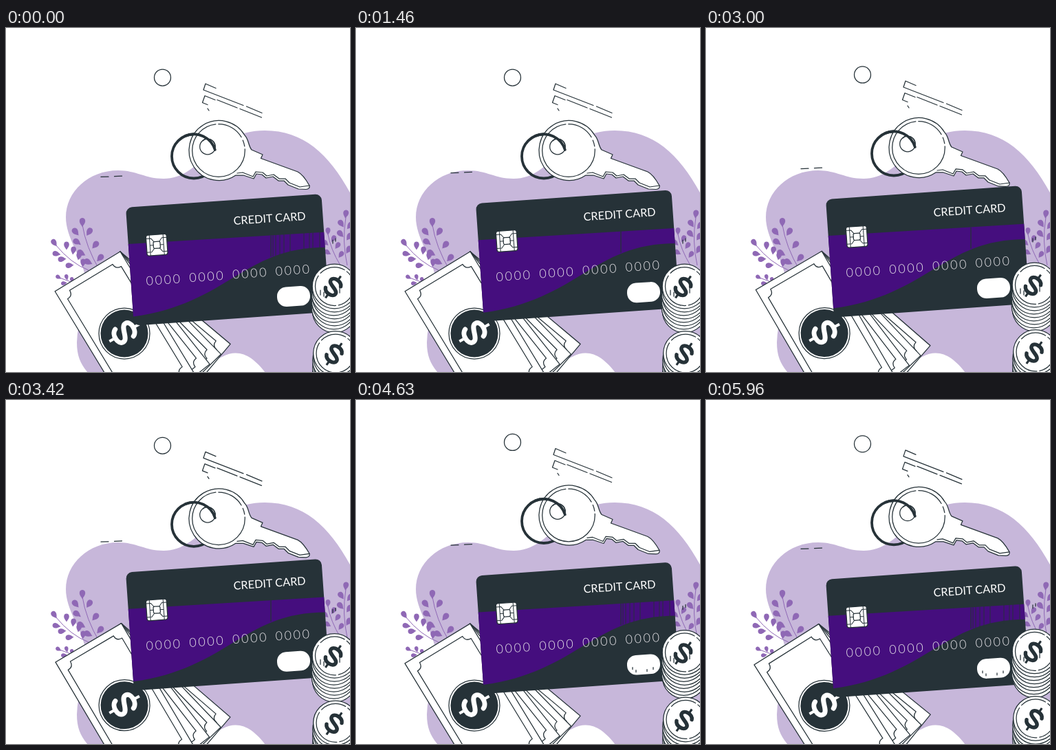
An HTML page that plays this animation: 500 by 500 pixels, repeating every 6000 ms.

```html
<!DOCTYPE html>
<html lang="en">
<head>
<meta charset="utf-8">
<title>Card, key and cash</title>
<style>
html, body { margin: 0; width: 100%; height: 100%; overflow: hidden; background: #fff; }
svg { display: block; width: 100vw; height: 100vh; }
.ink { fill: none; stroke: #263238; stroke-width: 1.25; stroke-linecap: round; stroke-linejoin: round; }
.paper { fill: #fff; }
.dark { fill: #263238; }
.leaf { fill: #8f68b5; }
.stem { fill: none; stroke: #8f68b5; stroke-width: 1; }
text { font-family: Lato, "Open Sans", sans-serif; fill: #fff; }
.digits { font-size: 18px; font-weight: 300; letter-spacing: 2.6px; fill: #e8e6ea; }
</style>
</head>
<body>
<svg viewBox="0 0 500 500" id="stage"></svg>
<script>
const LOOP = 6000, RISE = 12;

const leaf = (x, y, angle, size) =>
  `<path class="leaf" transform="translate(${x} ${y}) rotate(${angle}) scale(${size})"
    d="M0 8C-2 4-5 2-4.6-2.5C-4-8 4-8 4.6-2.5C5 2 2 4 0 8Z"/>`;

// Each leaf is [x, y, angle]; the stem runs from base to tip.
const branch = (stem, size, leaves) =>
  `<path class="stem" d="${stem}"/>` + leaves.map(l => leaf(...l, size)).join('');

const plants =
  branch('M136 352Q116 318 111 286', .9, [
    [111, 282, 0], [101, 296, -40], [121, 296, 32], [103, 311, -55], [130, 315, 40],
    [109, 327, -62], [137, 334, 42], [119, 340, -65]]) +
  branch('M120 352Q94 342 72 315', .82, [
    [70, 312, -35], [73, 328, -80], [88, 316, 0], [81, 336, -95], [98, 323, 8],
    [92, 345, -95], [106, 331, 10], [112, 341, 5]]) +
  branch('M108 374L78 363', .6, [[76, 362, -60], [88, 362, -15], [84, 371, -100], [96, 366, -15]]) +
  branch('M486 345Q472 322 468 300', .75, [
    [468, 295, 0], [476, 306, 30], [464, 312, -50], [482, 316, 35], [467, 326, -60], [487, 329, 35]]) +
  branch('M496 345Q488 310 494 275', .85, [
    [494, 270, 8], [487, 284, -35], [500, 287, 38], [486, 299, -42], [499, 303, 35], [498, 322, 30]]);

const dollar = (x, y, angle, size, color) =>
  `<g transform="translate(${x} ${y}) rotate(${angle}) scale(${size})"
    fill="none" stroke="${color}" stroke-linecap="round">
    <path stroke-width="7" d="M11-9C7-18-11-17-11-8C-11 1 11-1 11 8C11 17-7 18-11 9"/>
    <path stroke-width="4" stroke-linecap="butt" d="M0-25V-15M0 15V25"/></g>`;

// A note lies along its long side, pinned at the shared top corner of the fan.
const note = angle =>
  `<g transform="translate(166 325) rotate(${angle})" class="ink">
    <rect class="paper" width="209" height="111"/>
    <path d="M19 10H190Q190 19 199 19V92Q190 92 190 101H19Q19 92 10 92V19Q19 19 19 10Z"/></g>`;

const bills = [40, 45.5, 51.5, 58.7].map(note).join('') +
  `<circle class="ink paper" cx="172" cy="444" r="37"/>
   <circle class="dark" cx="172" cy="444" r="34.5"/>` + dollar(172, 443, 60, 1, '#fff');

const disc = (x, y) => `<circle class="ink paper" cx="${x}" cy="${y}" r="32.3"/>`;
const coin = (x, y) => disc(x, y) +
  `<circle class="ink" cx="${x}" cy="${y}" r="28" stroke-width="1" stroke-dasharray="38 4 62 5"/>` +
  dollar(x - 2, y + 1, 35, .78, '#263238');
const stack = (x, y) =>
  Array.from({ length: 8 }, (_, i) => i < 7 ? disc(x - i % 2, y + 35 - i * 5) : coin(x, y)).join('');

const coins = stack(477.5, 375.5) + stack(479, 473) +
  `<path class="ink" stroke-width="1" d="M475 308v5M479 306v4M457 381v7M462 384v6M485 377v8"/>`;

const bars = [388, 392, 398, 404, 413, 433, 441, 446, 456]
  .map(x => `M${x} ${301.5 - (x - 385) * .06}V${332 - (x - 385) * .17}`).join('');

const card = `
  <path class="ink" d="M138 216.5l11-.3M157.5 215.7l11-.5"/>
  <clipPath id="face"><rect id="plate" width="285" height="172" rx="9"
    transform="translate(174 261) rotate(-4)"/></clipPath>
  <g clip-path="url(#face)">
    <rect class="dark" x="160" y="230" width="320" height="215"/>
    <path fill="#450e7e" d="M170 314.5L475 296V319C405 317 371 339 330 363C285 391 240 415 170 421Z"/>
    <path class="ink" d="M385 302V332" stroke-width="1"/>
    <path class="ink" id="bars" d="${bars}" stroke-width="1" opacity=".75"/>
  </g>
  <g transform="translate(219.2 315.3) rotate(-4)" class="ink">
    <rect class="paper" x="-15" y="-15" width="30" height="30" rx="3"/>
    <rect x="-5" y="-5" width="10" height="10" rx="2"/>
    <path d="M-15-10H-8L-4-5M15-10H8L4-5M-15 10H-8L-4 5M15 10H8L4 5M-5 0H-10V-15M5 0H10V-15M-10 0V15M10 0V15"
      stroke-width="1"/>
  </g>
  <text font-size="16.3" transform="translate(331 286) rotate(-3.9)">CREDIT CARD</text>
  ${[0, 1, 2, 3].map(i =>
    `<text class="digits" transform="translate(${204 + i * 62.7} ${374 - i * 4.7}) rotate(-4)">0000</text>`).join('')}
  <rect class="paper" x="-24" y="-14.3" width="48" height="28.6" rx="13.5"
    transform="translate(418 390) rotate(-4)"/>
  <path class="ink" id="ticks" stroke-width="1" d="M402 394v3M407 398v3M423 397v3M432 394v3"/>`;

const key = `
  <circle class="ink" cx="227.5" cy="72" r="12"/>
  <path class="ink" d="M305 87.5L290 81L287 90L345 112.5M349.5 114L372 123.5
    M304 104.5L289 98.5L285.5 108.5L293 111.5M307 104.5L336 116M340 117.5L371.5 130M293 117l2 3"/>
  <circle class="ink" cx="273" cy="186.5" r="32" style="stroke-width:3.8"/>
  <path class="ink paper" d="M347 156C353 162 352 171 357 177L373 184L370.5 189.5L424 209
    Q432 213 441 229Q442 234 436 234.5L425 234L410 228L404 222L396 222L388 216L378 218L372 213
    L364 212L360 219L345 214L334 214A43.5 43.5 0 1 1 347 156Z"/>
  <path class="ink" d="M441 229L427 231L412 225L406 219L397 219L389 213L379 215L373 210L363 209L359 216L344 210L336 211"
    stroke-width="1"/>
  <circle class="ink" cx="309" cy="178" r="38.3" stroke-dasharray="176 4 40 5 9 4"/>
  <circle class="ink" cx="293" cy="172.5" r="11.3"/>
  <path class="ink" d="M286 164C291 158 303 162 304 172"/>
  <path class="ink" d="M261 156.8A32 32 0 0 1 303.8 177" style="stroke-width:3.8"/>`;

const blob = `<path fill="#c7b7da" d="M87 275C87 238 120 207 163 207C190 207 202 219 229 219
  C284 219 300 149 376 149C433 149 470 184 501 241V501H377C360 479 340 464 314 478
  C298 486 286 494 278 501H119C108 488 103 476 103 457C104 420 122 385 114 356C109 332 87 304 87 275Z"/>`;

const $ = id => document.getElementById(id);
$('stage').innerHTML = blob + plants +
  Object.entries({ bills, card, key, coins }).map(([id, art]) => `<g id="${id}">${art}</g>`).join('');

// Linear rise and fall, three seconds each way, after a delay.
function lift(t, delay) {
  const p = Math.max(0, t - delay) / 3000;
  return -RISE * (p < 1 ? p : 2 - p);
}

// Sway one degree clockwise, then one degree back past rest.
function sway(t) {
  const p = Math.max(0, t - 1500) / 1500;
  return p < 1 ? p : 2 - p;
}

function draw(now) {
  const t = now % LOOP;
  const move = (id, delay) => $(id).setAttribute('transform', `translate(0 ${lift(t, delay)})`);
  move('card', 0);
  move('key', 2000);
  move('coins', 2500);
  $('bills').setAttribute('transform', `rotate(${sway(t)} 198 450)`);
  $('bars').style.display = t < 1400 || t > 3800 ? '' : 'none';
  $('ticks').style.display = t > 4400 ? '' : 'none';
  requestAnimationFrame(draw);
}
draw(0);
</script>
</body>
</html>
```
